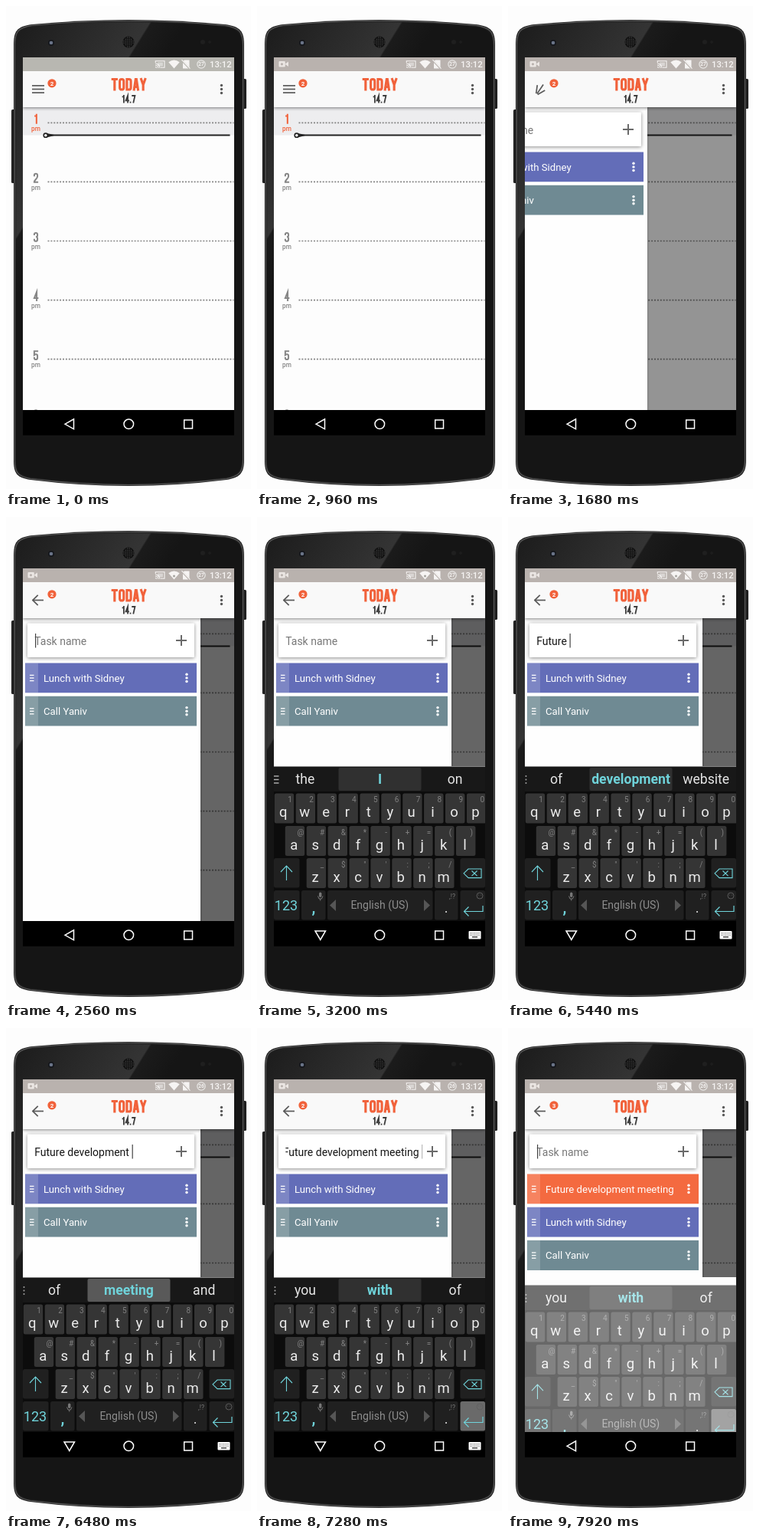
Write an HTML page with a canvas that moves like this. It is 320 by 630 pixels and loops after 8000 ms.

```html
<!DOCTYPE html>
<html lang="en">
<head>
<meta charset="utf-8">
<title>Day planner</title>
<style>
html, body { margin: 0; width: 100%; height: 100%; overflow: hidden; background: #fdfdfd; }
canvas { display: block; width: 320px; height: 630px; }
</style>
</head>
<body>
<canvas id="stage" role="img" aria-label="Today, 14.7: adding a task to a day planner"></canvas>
<script>
const LOOP = 8000;
const ORANGE = '#f1623b', CYAN = '#6fd3da';
const SANS = 'Roboto, Arial, sans-serif';
const canvas = document.getElementById('stage');
const c = canvas.getContext('2d');
const ratio = window.devicePixelRatio || 1;
canvas.width = 320 * ratio;
canvas.height = 630 * ratio;

const clamp = v => Math.max(0, Math.min(1, v));
const span = (t, from, to) => clamp((t - from) / (to - from));
const mix = (a, b, p) => a + (b - a) * p;
const within = (t, a, b) => t >= a && t < b;

function box(x, y, w, h, fill, r = 0) {
  c.fillStyle = fill;
  c.beginPath();
  c.roundRect(x, y, w, h, r);
  c.fill();
}
function dot(x, y, r, fill) {
  c.fillStyle = fill;
  c.beginPath();
  c.arc(x, y, r, 0, Math.PI * 2);
  c.fill();
}
function ring(x, y, r, color, width) {
  c.strokeStyle = color;
  c.lineWidth = width;
  c.beginPath();
  c.arc(x, y, r, 0, Math.PI * 2);
  c.stroke();
}
function trace(pts, closed) {
  c.beginPath();
  for (let i = 0; i < pts.length; i += 2) c.lineTo(pts[i], pts[i + 1]);
  if (closed) c.closePath();
}
function line(pts, color, width, closed) {
  trace(pts, closed);
  c.strokeStyle = color;
  c.lineWidth = width;
  c.stroke();
}
function poly(pts, fill) {
  trace(pts, true);
  c.fillStyle = fill;
  c.fill();
}
function text(str, x, y, font, fill, align = 'left') {
  c.font = font;
  c.fillStyle = fill;
  c.textAlign = align;
  c.fillText(str, x, y);
}
function clipped(x, y, w, h, draw) {
  c.save();
  c.beginPath();
  c.rect(x, y, w, h);
  c.clip();
  draw();
  c.restore();
}
function shadowed(blur, alpha, dy, draw) {
  c.save();
  c.shadowColor = `rgba(0,0,0,${alpha})`;
  c.shadowBlur = blur * ratio;
  c.shadowOffsetY = dy * ratio;
  draw();
  c.restore();
}
const dots = (x, y, gap, r, fill) => [-1, 0, 1].forEach(i => dot(x, y + i * gap, r, fill));

// Tall display lettering: pen strokes on a 5 x 13 skeleton.
const TALL = {
  T: 'M0 0H5M2.5 0V13',
  O: 'M0 2.5Q0 0 2.5 0Q5 0 5 2.5V10.5Q5 13 2.5 13Q0 13 0 10.5Z',
  D: 'M0 0H2.5Q5 0 5 2.5V10.5Q5 13 2.5 13H0Z',
  A: 'M0 13L2 0H3L5 13M1 9.5H4',
  Y: 'M0 0L2.5 7L5 0M2.5 7V13',
  1: 'M0 2H2M2 0V13',
  2: 'M0 3V2.5Q0 0 2.5 0Q5 0 5 2.5V4Q5 6 2.5 8.5Q0 11 0 13H5',
  3: 'M0 2.5Q0 0 2.5 0Q5 0 5 2.5V4Q5 6.2 2.5 6.2Q5 6.2 5 8.5V10.5Q5 13 2.5 13Q0 13 0 10.5',
  4: 'M3.8 13V0L0 9.5H5.3',
  5: 'M5 0H0V6Q1 5 2.5 5Q5 5 5 7.5V10.5Q5 13 2.5 13Q0 13 0 10.5',
  6: 'M5 2.5Q5 0 2.5 0Q0 0 0 2.5V10.5Q0 13 2.5 13Q5 13 5 10.5V8Q5 5.8 2.5 5.8Q0 5.8 0 8',
  7: 'M0 0H5L2 13',
  '.': 'M0 13H.01'
};
const penWidth = ch => ch === '1' ? 2 : ch === '.' ? 0 : 5;
function tall(str, cx, top, height, color, pen = 3) {
  const k = height / 16;
  const gap = 4;
  const total = [...str].reduce((w, ch) => w + penWidth(ch) + gap, -gap);
  c.save();
  c.translate(cx - total * k / 2, top + 1.5 * k);
  c.scale(k, k);
  c.lineCap = 'square';
  c.lineWidth = pen;
  c.strokeStyle = color;
  for (const ch of str) {
    c.stroke(new Path2D(TALL[ch]));
    c.translate(penWidth(ch) + gap, 0);
  }
  c.restore();
}

function bodyPath(d) {
  const l = 10 + d, r = 311 - d;
  c.beginPath();
  c.moveTo(l, 52);
  c.bezierCurveTo(l, 32 + d, 14 + d, 27 + d, 34, 24 + d);
  c.quadraticCurveTo(160, 12 + d, 286, 24 + d);
  c.bezierCurveTo(306 - d, 27 + d, r, 32 + d, r, 52);
  c.lineTo(r, 592);
  c.bezierCurveTo(r, 610 - d, 305 - d, 615 - d, 288, 618 - d);
  c.quadraticCurveTo(160, 634 - d, 32, 618 - d);
  c.bezierCurveTo(14 + d, 615 - d, l, 610 - d, l, 592);
  c.closePath();
}
function phone() {
  box(7, 135, 5, 96, '#222', 1.5);
  box(309, 95, 5, 39, '#222', 1.5);
  bodyPath(0);
  c.fillStyle = '#1f1f1f';
  c.fill();
  bodyPath(1.4);
  c.strokeStyle = '#585858';
  c.lineWidth = 1.2;
  c.stroke();
  bodyPath(3);
  const g = c.createLinearGradient(39, -41, 209, 65);
  g.addColorStop(0.1, '#1d1d1d');
  g.addColorStop(0.795, '#343434');
  g.addColorStop(0.805, '#1b1b1b');
  g.addColorStop(1, '#151515');
  c.fillStyle = g;
  c.fill();
  dot(59, 48, 4, '#15171c');
  dot(59, 48, 2.3, '#6a7488');
  dot(160, 47, 7.5, '#121212');
  for (let y = -6; y <= 6; y += 2.4)
    for (let x = -6; x <= 6; x += 2.4)
      if (x * x + y * y < 40) dot(160 + x, 47 + y, 0.7, '#444');
  dot(257, 47, 3, '#1f1f1f');
  dot(266, 47, 2, '#1d1d1d');
}

function dayList() {
  box(22, 132, 276, 396, '#fdfdfd');
  box(22, 132, 276, 36.5, '#ededef');
  for (let i = 0; i < 6; i++) {
    const y = 152.3 + i * 77.1;
    const ink = i ? '#868686' : ORANGE;
    c.setLineDash([2, 1.9]);
    line([54.5, y, 297.5, y], '#858585', 1.7);
    c.setLineDash([]);
    tall(String(i + 1), 39, y - 11.8, 13.4, ink, 2.4);
    text('pm', 39, y + 10.5, `500 8.3px ${SANS}`, ink, 'center');
  }
  line([55, 168.5, 292.5, 168.5], '#222', 1.9);
  poly([53, 166, 63, 168, 63, 169, 53, 171.5], '#222');
  dot(51.8, 168.7, 3.4, '#222');
  dot(51.8, 168.7, 1.8, '#fff');
}

function menuIcon(p) {
  c.save();
  c.translate(42, 108.5);
  c.rotate(-Math.PI * (1 - p));
  const shaft = mix(8, 7, p);
  line([-shaft, 0, shaft, 0], '#5a5a5a', 1.7);
  for (const s of [-1, 1])
    line([mix(-8, -7.5, p), s * mix(4.6, -0.4, p), mix(8, -0.3, p), s * mix(4.6, 6.7, p)], '#5a5a5a', 1.7);
  c.restore();
}
function header(t, open) {
  shadowed(4, 0.5, 1, () => box(22, 85, 276, 47, '#f9f9f9'));
  menuIcon(open);
  dot(60, 100.8, 5.6, ORANGE);
  text(t < 7440 ? '2' : '3', 60, 103.7, `bold 8px ${SANS}`, '#fff', 'center');
  tall('TODAY', 160.5, 94, 16.6, ORANGE);
  tall('14.7', 160.5, 116, 10.6, '#3c3c3c', 2.7);
  dots(281.5, 108.5, 5, 1.7, '#585858');
}
function statusBar(t) {
  const live = t >= 320;
  const back = live ? '#b9b2ae' : '#b8b7b1';
  const white = '#f6f4f3';
  box(22, 67, 276, 18, back);
  if (live) {
    box(28.5, 72, 8.3, 7.6, '#ebe6e3', 1);
    poly([36.5, 75.8, 41, 72.5, 41, 79], '#ebe6e3');
    dot(32.5, 75.8, 1.6, back);
  }
  line([195.3, 74, 195.3, 71.7, 207, 71.7, 207, 80.3, 202, 80.3], white, 1.1);
  box(198, 73.5, 7, 5, 'rgba(255,255,255,.45)');
  for (const r of [1.5, 3.8, 6]) {
    c.beginPath();
    c.arc(195, 81, r, -Math.PI / 2, 0);
    c.strokeStyle = white;
    c.lineWidth = 1.1;
    c.stroke();
  }
  c.beginPath();
  c.moveTo(219.5, 81.5);
  c.lineTo(212.3, 73.2);
  c.quadraticCurveTo(219.5, 67.8, 226.7, 73.2);
  c.closePath();
  c.fillStyle = white;
  c.fill();
  if (within(t, 2240, 6160)) dot(219.5, 77, 1.5, '#a5a39f');
  poly([233, 70.5, 239.5, 70.5, 239.5, 81.5, 231, 81.5, 231, 72.5], white);
  line([229.5, 71, 240, 82], back, 2);
  line([229.5, 70.2, 240.5, 81.7], white, 1.1);
  ring(255, 76, 5.2, '#e9e8e6', 1.2);
  text(t < 6480 ? '27' : '26', 255, 78.4, `bold 6.5px ${SANS}`, white, 'center');
  text('13:12', 280.3, 80.2, `500 11.3px ${SANS}`, white, 'center');
}

const TYPED = [[4400, 'F'], [4560, 'Fu'], [4720, 'Fut'], [4880, 'Futu'], [5040, 'Futur'],
  [5200, 'Future '], [5680, 'Future development '], [6560, 'Future development meeting '], [7440, '']];
const HINTS = [[0, 'the', 'I', 'on'], [5200, 'of', 'development', 'website'],
  [5680, 'of', 'meeting', 'and'], [6560, 'you', 'with', 'of']];
const at = (list, t) => list.filter(e => e[0] <= t).pop();

function cursorOn(t) {
  if (t < 4400) return within(t, 2560, 3040) || within(t, 3520, 3840);
  return true;
}
function inputCard(t) {
  shadowed(5, 0.45, 1, () => box(28, 138.5, 218, 44.5, '#fff', 1));
  line([222, 161, 236, 161], '#6a6a6a', 2);
  line([229, 154, 229, 168], '#6a6a6a', 2);
  const str = (at(TYPED, t) || [0, ''])[1];
  const font = `14px ${SANS}`;
  clipped(37.4, 145, 179, 32, () => {
    c.font = font;
    const w = c.measureText(str).width;
    const x = Math.min(37.2, 215 - w);
    text(str || 'Task name', x, 166.8, font, str ? '#161616' : '#777');
    const end = str ? x + w + 0.2 : 38;
    if (cursorOn(t)) box(end, 152, 1.2, 18.5, w > 150 ? '#a9a9a9' : '#444');
  });
}
function task(label, y, fill, alpha = 1) {
  c.save();
  c.globalAlpha = alpha;
  box(25, y, 224, 38.8, fill);
  box(25, y, 17, 38.8, 'rgba(255,255,255,.17)');
  for (const d of [-3.6, 0, 3.6]) line([31, y + 19.5 + d, 36.5, y + 19.5 + d], '#fff', 1.3);
  text(label, 49, y + 24.2, `13.2px ${SANS}`, '#fff');
  dots(236, y + 19.4, 4.6, 1.7, '#fff');
  c.restore();
}
function drawer(t, open) {
  c.save();
  c.translate(-232 * (1 - open), 0);
  shadowed(3, 0.5, 0, () => box(22, 130, 232, 400, '#fefefe'));
  const q = span(t, 7440, 7690);
  const shift = 43.3 * (0.5 - Math.cos(q * Math.PI) / 2);
  const fade = span(t, 7650, 7810);
  if (fade) task('Future development meeting', 190.5, '#f46a40', fade);
  task('Lunch with Sidney', 190.5 + shift, '#636db8');
  task('Call Yaniv', 233.8 + shift, '#6f8a93');
  inputCard(t);
  c.restore();
}

const PITCH = 27.9;
const ROWS = [
  ['qwertyuiop', '1234567890', 21.6, 360.5],
  ['asdfghjkl', '@#&*-+=()', 35.6, 403],
  ['zxcvbnm', '_$"\':;/', 63.5, 445]
];
const PRESSES = [[4240, 4400, 'f'], [4480, 4560, 'u'], [4640, 4720, 't'],
  [4800, 4880, 'u'], [4960, 5040, 'r'], [5120, 5200, 'e']];

function keyboard(t) {
  box(22, 325.5, 276, 202, '#0c0c0c');
  box(22, 326, 276, 32, '#181818');
  const tap = within(t, 5600, 5680) || within(t, 6480, 6560);
  box(106.5, 327, 108, 30, tap ? '#595959' : '#303030', 2);
  const hint = at(HINTS, t);
  const font = `17.6px ${SANS}`;
  text(hint[1], 63, 348, font, '#e6e6e6', 'center');
  text(hint[2], 160.5, 348, `bold 17.6px ${SANS}`, CYAN, 'center');
  text(hint[3], 258.7, 348, font, '#e6e6e6', 'center');
  if (t < 5200) for (const y of [338, 342.5, 347]) line([22, y, 28.5, y], '#b5b5b5', 1.4);
  else dots(23.5, 342.5, 4.5, 1, '#a5a5a5');

  const press = PRESSES.find(p => within(t, p[0], p[1]));
  for (const [keys, marks, x0, y] of ROWS)
    [...keys].forEach((k, i) => {
      const x = x0 + i * PITCH;
      box(x + 1.2, y, 25.4, 39, press && press[2] === k ? '#696969' : '#353535', 2.5);
      text(k, x + 12.7, y + 30.7, `18.5px ${SANS}`, '#ececec', 'center');
      text(marks[i], x + 21.5, y + 11.8, `10px ${SANS}`, '#808080', 'center');
    });

  const side = '#202020';
  for (const [x, y, w] of [[22, 445, 33.5], [265.5, 445, 32.5], [22, 487, 33.5],
    [58, 487, 31.5], [92, 487, 137.5], [232, 487, 30.5]]) box(x, y, w, 38.5, side, 2.5);
  box(265.5, 487, 32.5, 38.5, t >= 7280 ? '#6a6a6a' : side, 2.5);

  line([38.5, 474, 38.5, 455], CYAN, 1.1);
  line([31, 463, 38.5, 455, 46, 463], CYAN, 1.1);
  line([270, 464.8, 276, 459, 293, 459, 293, 470.6, 276, 470.6], CYAN, 1.1, true);
  line([280.5, 461.5, 287.5, 468.2], CYAN, 1.1);
  line([287.5, 461.5, 280.5, 468.2], CYAN, 1.1);
  text('123', 38, 513.3, `18px ${SANS}`, CYAN, 'center');
  text(',', 74, 516, `bold 20px ${SANS}`, CYAN, 'center');
  box(81, 489.5, 3.4, 6.5, '#777', 1.7);
  line([79.5, 494.5, 81, 498, 84.4, 498, 86, 494.5], '#777', 1);
  line([82.7, 498, 82.7, 500.5], '#777', 1);
  poly([95, 506.5, 103, 499, 103, 514], '#565656');
  poly([226, 506.5, 218, 499, 218, 514], '#565656');
  text('English (US)', 160.3, 511.2, `14px ${SANS}`, '#8e8e8e', 'center');
  text('.', 247, 516, `18px ${SANS}`, '#e3e3e3', 'center');
  text(',!?', 255, 497.5, `8.5px ${SANS}`, '#777', 'center');
  line([295, 507, 295, 514.5, 270.5, 514.5], CYAN, 1.2);
  line([276.5, 508.5, 270.5, 514.5, 276.5, 520.5], CYAN, 1.2);
  ring(291, 494, 4, '#606060', 0.9);
  dot(289.5, 493, 0.6, '#606060');
  dot(292.5, 493, 0.6, '#606060');
}

function navBar(typing) {
  box(22, 527, 276, 33, '#000');
  if (typing) {
    line([76, 540, 89.5, 540, 82.8, 551.5], '#fff', 1.5, true);
    box(276.5, 540, 16, 10.5, '#fff', 1);
    for (const y of [542.3, 544.8]) for (let x = 279; x < 291; x += 2.6) box(x, y, 1, 1, '#000');
    box(281, 547.3, 7, 1.1, '#000');
  } else {
    line([77, 545.3, 88.5, 538.8, 88.5, 551.8], '#fff', 1.5, true);
  }
  ring(160.3, 545.3, 6.3, '#fff', 1.5);
  line([232.7, 540, 243.5, 540, 243.5, 551, 232.7, 551], '#fff', 1.5, true);
}

function draw(t) {
  c.setTransform(ratio, 0, 0, ratio, 0, 0);
  box(0, 0, 320, 630, '#fdfdfd');
  phone();
  const open = 1 - Math.pow(1 - span(t, 1560, 2140), 5);
  const resized = t >= 2800;
  box(22, 67, 276, 493, '#fefefe');
  clipped(22, 132, 276, resized ? 193 : 395, () => {
    dayList();
    if (open) {
      box(22, 132, 276, 396, `rgba(0,0,0,${0.6 * open})`);
      drawer(t, open);
    }
  });
  clipped(22, 67, 276, 70, () => {
    header(t, open);
    statusBar(t);
  });
  if (resized) {
    const rise = 1 - Math.pow(1 - span(t, 2760, 3120), 2);
    const solid = rise * (1 - 0.38 * span(t, 7800, 7920));
    clipped(22, 325, 276, 202, () => {
      c.translate(0, 26.5 * (1 - solid));
      keyboard(t);
      if (solid < 1) box(22, 325, 276, 203, `rgba(254,254,254,${1 - solid})`);
    });
  }
  navBar(resized && t < 7800);
}

const start = performance.now();
function tick() {
  draw((performance.now() - start) % LOOP);
  requestAnimationFrame(tick);
}
tick();
</script>
</body>
</html>
```
